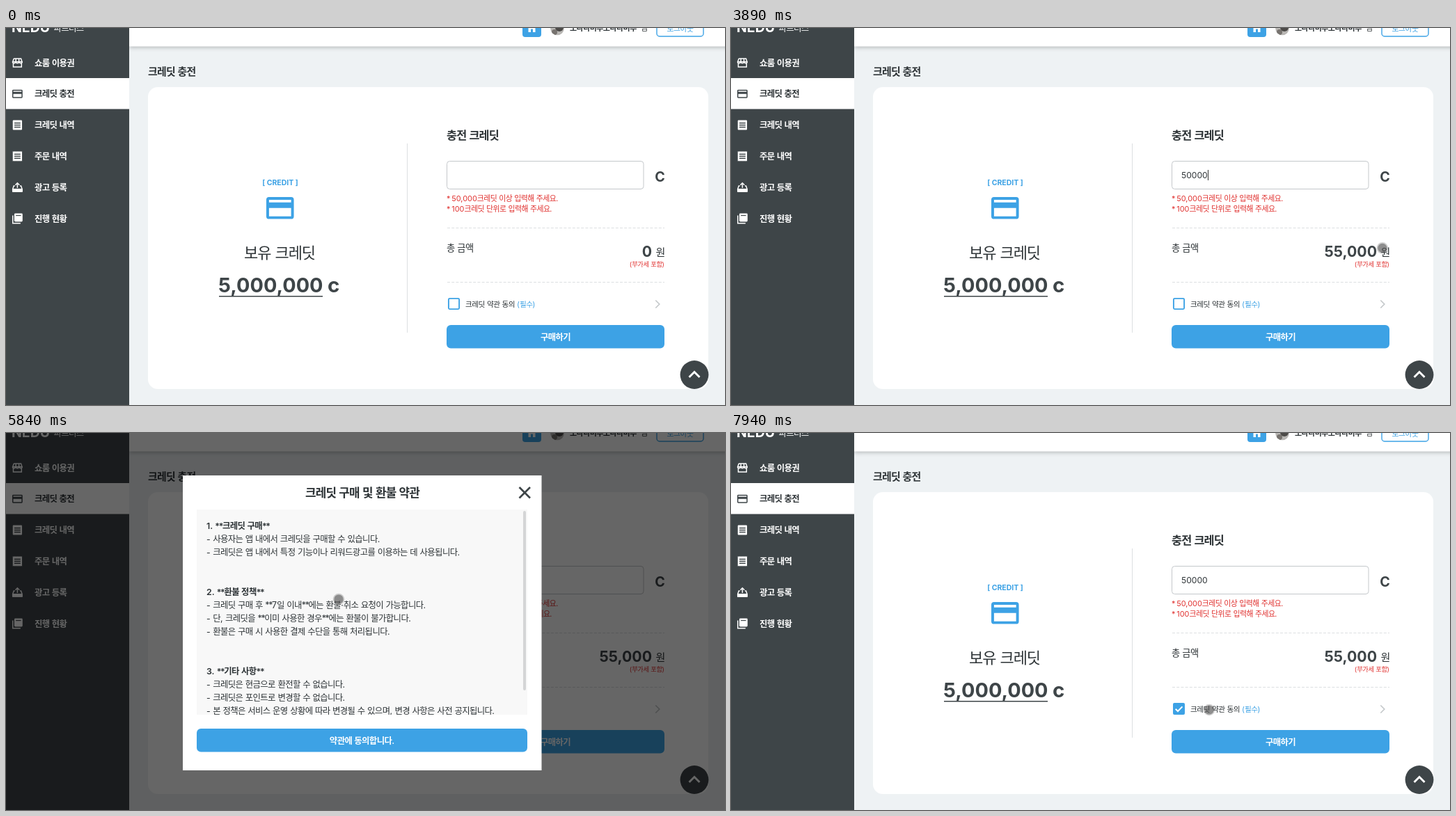
Animation of 1033 by 542 pixels, one loop 8 s. Source, as an HTML page with a canvas:

```html
<!DOCTYPE html>
<html lang="ko">
<head>
<meta charset="utf-8">
<title>크레딧 충전</title>
<style>
html, body { margin: 0; width: 100%; height: 100%; overflow: hidden; background: #eef2f4; }
canvas { display: block; width: 1033px; height: 542px; }
</style>
</head>
<body>
<canvas id="stage"></canvas>
<script>
const W = 1033, H = 542, LOOP = 8000;
const BLUE = '#3da2e5', DARK = '#3e4548', RED = '#e0312f', TEXT = '#2d3336';
const canvas = document.getElementById('stage');
const c = canvas.getContext('2d');
const dpr = window.devicePixelRatio || 1;
canvas.width = W * dpr;
canvas.height = H * dpr;

// ---- drawing helpers ----
function box(x, y, w, h, r, fill, stroke, lw = 1) {
  c.beginPath();
  c.roundRect(x, y, w, h, r);
  if (fill) { c.fillStyle = fill; c.fill(); }
  if (stroke) { c.strokeStyle = stroke; c.lineWidth = lw; c.stroke(); }
}
function line(pts, color, lw, dash = []) {
  c.beginPath();
  pts.forEach(([x, y], i) => i ? c.lineTo(x, y) : c.moveTo(x, y));
  c.strokeStyle = color;
  c.lineWidth = lw;
  c.setLineDash(dash);
  c.stroke();
  c.setLineDash([]);
}
function disc(x, y, r, fill) {
  c.beginPath();
  c.arc(x, y, r, 0, 7);
  c.fillStyle = fill;
  c.fill();
}
// Hangul and asterisks are set tighter than Latin; y is the middle of the glyphs.
function text(str, x, y, size, weight, color, align = 0) {
  c.font = `${weight} ${size}px Inter, "Noto Sans CJK KR", sans-serif`;
  c.fillStyle = color;
  const runs = str.match(/[가-힣]+|\*+|[^가-힣*]+/g) || [];
  const spacing = run => {
    const em = /[가-힣]/.test(run) ? -0.05 : run[0] === '*' ? -0.11 : 0;
    c.letterSpacing = em * size + 'px';
  };
  const widths = runs.map(run => { spacing(run); return c.measureText(run).width; });
  const total = widths.reduce((a, b) => a + b, 0);
  let at = x - total * align;
  runs.forEach((run, i) => {
    spacing(run);
    c.fillText(run, at, y + size * 0.365);
    at += widths[i];
  });
  return total;
}
function icon(x, y, scale, draw) {
  c.save();
  c.translate(x, y);
  c.scale(scale, scale);
  draw();
  c.restore();
}

// ---- icons on a 24 unit grid ----
function cardIcon(color) {
  c.fillStyle = color;
  c.beginPath();
  c.roundRect(2, 4, 20, 16, 2);
  c.rect(4, 6, 16, 2);
  c.rect(4, 12, 16, 6);
  c.fill('evenodd');
}
function shopIcon() {
  line([[4, 12], [4, 20], [20, 20], [20, 12]], '#fff', 2);
  line([[5, 4], [19, 4], [21, 10], [3, 10], [5, 4]], '#fff', 2);
  for (const x of [9, 15]) line([[x, 4], [x, 11]], '#fff', 2);
  for (const x of [5.5, 12, 18.5]) {
    c.beginPath();
    c.arc(x, 10, 2.8, 0, Math.PI);
    c.stroke();
  }
}
function listLines() {
  for (const y of [8, 12, 16]) line([[6, y], [18, y]], DARK, 2);
}
function listIcon() {
  box(3, 2.5, 18, 19, 1.5, '#fff');
  listLines();
}
function receiptIcon() {
  c.beginPath();
  for (let i = 0; i <= 12; i++) c.lineTo(3 + i * 1.5, i % 2 ? 3.5 : 2);
  for (let i = 12; i >= 0; i--) c.lineTo(3 + i * 1.5, i % 2 ? 20.5 : 22);
  c.fillStyle = '#fff';
  c.fill();
  listLines();
}
function uploadIcon() {
  line([[7, 9], [5, 9], [3, 15], [3, 20], [21, 20], [21, 15], [19, 9], [17, 9]], '#fff', 2);
  box(2, 14.5, 20, 6.5, 1.5, '#fff');
  line([[12, 13], [12, 4]], '#fff', 2);
  line([[8, 7.5], [12, 3.5], [16, 7.5]], '#fff', 2);
}
function stackIcon() {
  line([[3, 6], [3, 21], [18, 21]], '#fff', 2);
  box(6, 2, 16, 16, 2, '#fff');
  line([[9, 6], [19, 6]], DARK, 1.6);
}
function checkIcon(on) {
  if (!on) return box(635.9, 388.9, 15.2, 15.2, 1.5, '#fff', BLUE, 1.9);
  box(635, 388, 17, 17, 2, BLUE);
  line([[638.7, 396.7], [642, 400], [648.4, 393.4]], '#fff', 2);
}

// ---- timing ----
// Progress in n equal hops, the first at t0 and the last at t1.
function hops(t, t0, t1, n) {
  if (t < t0) return 0;
  const step = (t1 - t0) / (n - 1) || 1;
  return Math.min(n, Math.floor((t - t0) / step + 0.02) + 1) / n;
}
const ease = u => u * u * (3 - 2 * u);

// Smooth curve through the points.
function along(pts, u) {
  const k = Math.min(pts.length - 2, Math.floor(u * (pts.length - 1)));
  const s = u * (pts.length - 1) - k;
  const p = i => pts[Math.max(0, Math.min(pts.length - 1, i))];
  return [0, 1].map(d => {
    const [a, b, e, f] = [p(k - 1)[d], p(k)[d], p(k + 1)[d], p(k + 2)[d]];
    return b + s * ((e - a) / 2 + s * (a - 2.5 * b + 2 * e - f / 2 + s * (1.5 * (b - e) + (f - a) / 2)));
  });
}
// Start, end, hops, then the points passed on the way.
const moves = [
  [190, 400, 4, [780, 238]],
  [540, 610, 2, [806, 214]],
  [940, 1010, 2, [864, 159]],
  [1210, 1210, 1, [861, 159]],
  [3550, 4300, 12, [889, 270], [979, 350], [977, 359]],
  [4370, 4640, 5, [950, 390], [930.5, 397]],
  [5440, 5840, 7, [478, 239]],
  [6100, 6240, 3, [474, 242]],
  [6370, 7050, 10, [396, 300], [480, 438], [565, 467], [592, 443]],
  [7450, 7940, 8, [678, 430], [697, 414], [687, 398]]
];
const clicks = [[880, 940], [4840, 4910], [7250, 7310]];
const keys = [1740, 1940, 2140, 2410, 2740];
const FOCUS = 880, BLUR = 4840, OPEN = 4910, CLOSE = 7310;

function pointer(t) {
  if (t < moves[0][0]) return;
  let at = [951, 630];
  for (const [t0, t1, n, ...pts] of moves) {
    if (t < t0) break;
    const u = hops(t, t0, t1, n);
    at = along([at, ...pts], n > 5 ? ease(u) : u);
  }
  const down = clicks.some(([a, b]) => t >= a && t < b);
  disc(...at, 8.3, down ? 'rgba(222,216,50,.6)' : 'rgba(70,70,70,.25)');
  disc(...at, 6.6, down ? 'rgba(172,168,40,.6)' : 'rgba(75,75,75,.5)');
}

// ---- page ----
const menu = [
  ['쇼룸 이용권', shopIcon], ['크레딧 충전', () => cardIcon(DARK)], ['크레딧 내역', listIcon],
  ['주문 내역', receiptIcon], ['광고 등록', uploadIcon], ['진행 현황', stackIcon]
];
function sidebar() {
  box(0, 0, 177, H, 0, DARK);
  text('NEDU', 8, -1, 19.5, 700, '#fff');
  text('파트너스', 68.5, 0.5, 12.4, 500, '#fff');
  box(0, 72, 177, 44.6, 0, '#fff');
  menu.forEach(([label, draw], i) => {
    const y = 50 + i * 44.8;
    icon(7.5, y - 8.9, 0.74, draw);
    text(label, 41, y, 12.4, 600, i === 1 ? TEXT : '#fff');
  });
}
function header() {
  c.save();
  c.shadowColor = 'rgba(0,0,0,.25)';
  c.shadowBlur = 6 * dpr;
  c.shadowOffsetY = dpr;
  box(177, -30, W, 56.6, 0, '#fff');
  c.restore();
  box(742, -14, 27, 27, 4, BLUE);
  c.fillStyle = '#fff';
  c.beginPath();
  for (const [x, y] of [[755.5, -7], [763, 0], [760.5, 0], [760.5, 6], [757, 6], [757, 1.5],
    [754, 1.5], [754, 6], [750.5, 6], [750.5, 0], [748, 0]]) c.lineTo(x, y);
  c.fill();
  c.save();
  c.beginPath();
  c.arc(792, 0.5, 9.8, 0, 7);
  c.clip();
  box(780, -10, 24, 24, 0, '#b9b7b4');
  disc(795, -1, 6, '#4c4a48');
  disc(788, 6, 4, '#77736f');
  c.restore();
  text('노다라비루노다라비루', 810, 0, 11, 600, TEXT);
  text('님', 912, 0, 11, 400, TEXT);
  box(935, -14, 67, 26, 4, '#fff', BLUE, 1.4);
  text('로그아웃', 968.5, 1, 10.9, 500, BLUE, 0.5);
}
function balance() {
  text('[ CREDIT ]', 394, 222, 10.5, 700, BLUE, 0.5);
  icon(370, 235, 1.98, () => cardIcon(BLUE));
  text('보유 크레딧', 393, 322.5, 22, 400, TEXT, 0.5);
  text('5,000,000', 455.5, 369.5, 28.8, 700, DARK, 1);
  text('c', 462, 369.5, 29.5, 700, DARK);
  box(306, 385, 149, 1.5, 0, DARK);
}
function form(t) {
  const typed = keys.filter(k => t >= k);
  const value = '50000'.slice(0, typed.length);
  text('충전 크레딧', 633, 154, 16.3, 600, TEXT);
  box(633.5, 191.5, 282.5, 40, 4, '#fff', '#c4c8cb');
  const w = text(value, 647, 211.7, 12.1, 400, TEXT);
  const since = t - (typed.pop() || FOCUS);
  if (t >= FOCUS && t < BLUR && Math.floor(since / 530) % 2 === 0) {
    box(647.3 + w, 204, 1, 15, 0, '#333');
  }
  text('C', 946.7, 214, 19.7, 700, DARK, 1);
  text('* 50,000크레딧 이상 입력해 주세요.', 633, 244.7, 10.9, 400, RED);
  text('* 100크레딧 단위로 입력해 주세요.', 633, 260.5, 10.9, 400, RED);
  for (const y of [287.5, 365.5]) line([[634, y], [946, y]], '#dcdfe1', 1, [4, 2.2]);

  text('총 금액', 633, 316.5, 13.3, 400, TEXT);
  const total = Math.floor(Number(value) * 11 / 10).toLocaleString('en-US');
  text(total, 928, 321.3, 21.3, 700, DARK, 1);
  text('원', 946.5, 322.5, 15, 400, TEXT, 1);
  text('(부가세 포함)', 946, 340, 9.4, 400, RED, 1);

  checkIcon(t >= CLOSE);
  const lw = text('크레딧 약관 동의 ', 660, 397, 10.7, 400, TEXT);
  text('(필수)', 660 + lw, 397, 10.7, 400, BLUE);
  line([[933.3, 391.5], [938.8, 397], [933.3, 402.5]], '#c3c7c9', 1.6);
  box(633, 427, 313, 33.5, 6, BLUE);
  text('구매하기', 789.5, 444, 12.4, 600, '#fff', 0.5);
}
function page(t) {
  box(0, 0, W, H, 0, '#eef2f4');
  header();
  sidebar();
  text('크레딧 충전', 204, 63, 14.9, 600, TEXT);
  box(204, 85, 805, 434, 14, '#fff');
  box(576, 166, 1, 272, 0, '#dcdfe1');
  balance();
  form(t);
  disc(989, 498.5, 20.4, DARK);
  line([[981.5, 502], [989, 494.5], [996.5, 502]], '#fff', 3);
}

// ---- terms dialog ----
const terms = [
  '1. **크레딧 구매**',
  '- 사용자는 앱 내에서 크레딧을 구매할 수 있습니다.',
  '- 크레딧은 앱 내에서 특정 기능이나 리워드광고를 이용하는 데 사용됩니다.',
  '', '',
  '2. **환불 정책**',
  '- 크레딧 구매 후 **7일 이내**에는 환불·취소 요청이 가능합니다.',
  '- 단, 크레딧을 **이미 사용한 경우**에는 환불이 불가합니다.',
  '- 환불은 구매 시 사용한 결제 수단을 통해 처리됩니다.',
  '', '',
  '3. **기타 사항**',
  '- 크레딧은 현금으로 환전할 수 없습니다.',
  '- 크레딧은 포인트로 변경할 수 없습니다.',
  '- 본 정책은 서비스 운영 상황에 따라 변경될 수 있으며, 변경 사항은 사전 공지됩니다.'
];
function dialog(t) {
  const scroll = ease(hops(t, 5900, 6240, 6));
  box(0, 0, W, H, 0, 'rgba(0,0,0,.6)');
  box(254, 61, 515.5, 424, 0, '#fff');
  text('크레딧 구매 및 환불 약관', 512, 86, 16.9, 600, TEXT, 0.5);
  line([[737.5, 78], [753, 93.5]], DARK, 2.7);
  line([[753, 78], [737.5, 93.5]], DARK, 2.7);
  c.save();
  c.beginPath();
  c.rect(274, 110, 475, 295);
  c.clip();
  box(274, 110, 475, 295, 0, '#f8f8f8');
  terms.forEach((row, i) => {
    text(row, 288, 133 + i * 19 - 37 * scroll, 12.4, row[0] === '-' ? 400 : 600, TEXT);
  });
  box(743, 112 + 33 * scroll, 4, 258, 2, '#d4d5d6');
  c.restore();
  box(274, 425, 475, 33.5, 6, BLUE);
  text('약관에 동의합니다.', 511.5, 442, 12.4, 600, '#fff', 0.5);
}

function frame(now) {
  const t = now % LOOP;
  c.setTransform(dpr, 0, 0, dpr, 0, 0);
  page(t);
  if (t >= OPEN && t < CLOSE) dialog(t);
  pointer(t);
  requestAnimationFrame(frame);
}
requestAnimationFrame(frame);
</script>
</body>
</html>
```
